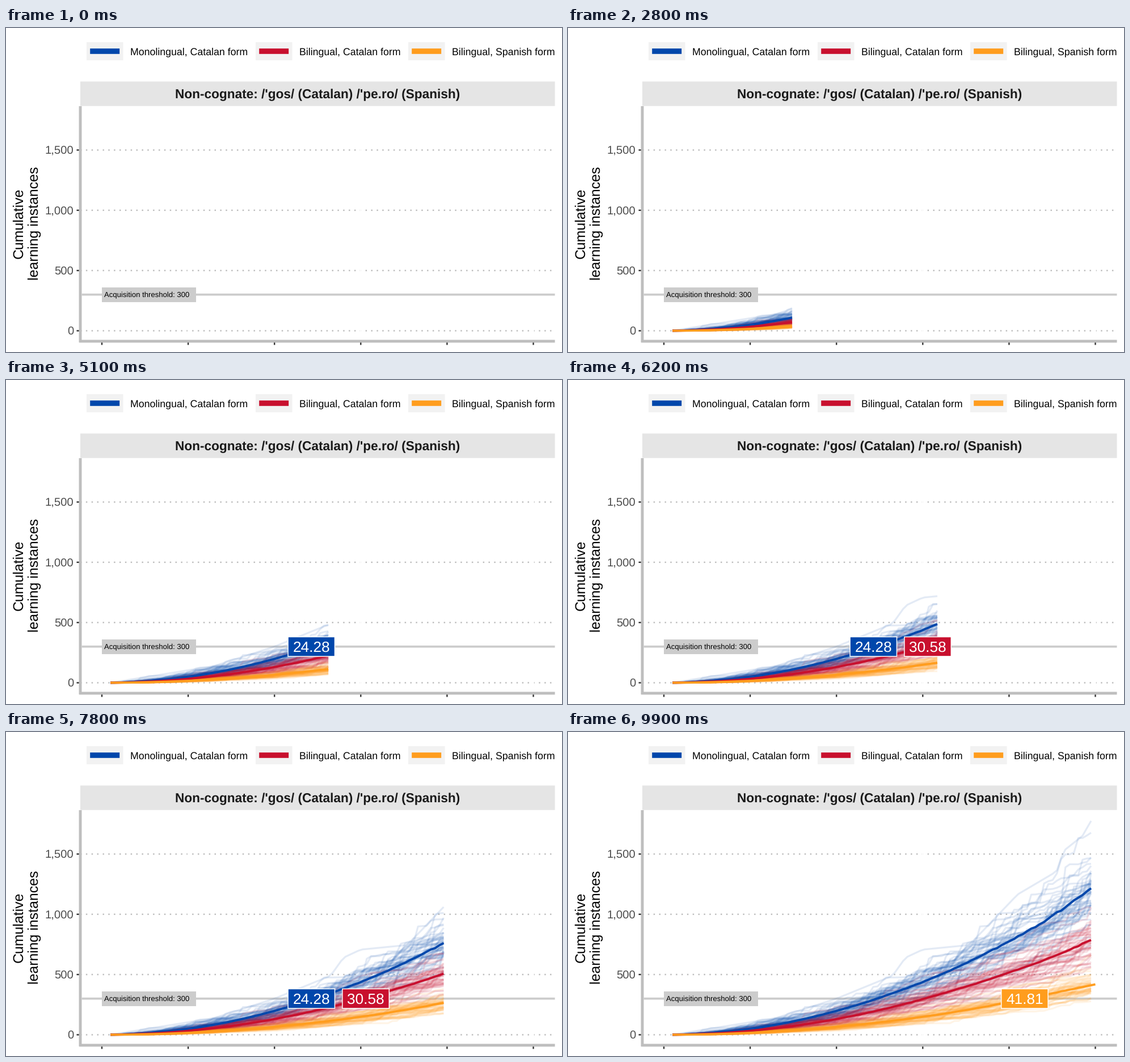
A matplotlib script that plays this animation: 980x572 px, repeating every 10 s.

```python
import numpy as np
import matplotlib.pyplot as plt
from matplotlib.animation import FuncAnimation
from matplotlib.collections import LineCollection
from matplotlib.patches import Rectangle

W, H, DPI = 980, 572, 100
PT = 72 / DPI                      # points per pixel
FRAMES, STRANDS = 100, 50
BLUE, RED, ORANGE = "#0047AB", "#C8102E", "#FF9D1E"
GREY, BAND, INK = "#BEBEBE", "#CCCCCC", "#333333"
LEFT, RIGHT, TOP, BOTTOM = 131, 967.5, 138, 553
THRESHOLD = 300

plt.rcParams.update({"font.family": "Liberation Sans",
                     "text.hinting": "none", "path.snap": False})

fig = plt.figure(figsize=(W / DPI, H / DPI), dpi=DPI, facecolor="white")
ax = fig.add_axes([0, 0, 1, 1])
ax.set(xlim=(0, W), ylim=(H, 0))
ax.axis("off")


def px(month):
    return 169 + 15.21 * month


def py(count):
    return 534.5 - 0.2127 * count


def rect(x0, y0, x1, y1, color, z=1, lw=0, **kw):
    return ax.add_patch(Rectangle((x0, y0), x1 - x0, y1 - y0, fc=color,
                                  lw=lw * PT, zorder=z, **kw))


def line(xs, ys, color, width, z=1, **kw):
    return ax.plot(xs, ys, color=color, lw=width * PT, zorder=z,
                   solid_capstyle="butt", **kw)[0]


def text(x, y, s, size, color="black", z=2, **kw):
    return ax.text(x, y, s, fontsize=size * PT, color=color, zorder=z,
                   va="baseline", **kw)


def draw_legend():
    keys = [(142, "Monolingual, Catalan form", BLUE),
            (440, "Bilingual, Catalan form", RED),
            (709, "Bilingual, Spanish form", ORANGE)]
    for x, name, color in keys:
        rect(x, 25, x + 64.6, 57, "#F2F2F2")
        line([x + 6.2, x + 58.2], [41, 41], color, 9.6, 2)
        text(x + 77, 47.3, name, 17.7)


def draw_panel():
    rect(LEFT, 94.5, RIGHT, 137.7, "#E5E5E5")
    text(549, 124.4, "Non-cognate: /'gos/ (Catalan) /'pe.ro/ (Spanish)", 22.6,
         "#1A1A1A", ha="center", weight="bold")
    for v in range(0, 1501, 500):
        y = py(v)
        line([LEFT, RIGHT], [y, y], GREY, 2.464,
             linestyle=(0, (1, 3)), dash_capstyle="butt")
        line([124.5, LEFT], [y, y], INK, 2.4)
        text(119, y + 7.2, f"{v:,}", 20.3, "#4D4D4D", ha="right")
    for m in range(0, 51, 10):
        x = px(m)
        line([x, x], [TOP, BOTTOM], "white", 2.4, 1.5)
        line([x, x], [BOTTOM, 559.5], INK, 2.4)
    line([LEFT, LEFT], [TOP, BOTTOM + 2], GREY, 4.9, 2)
    line([LEFT - 2, RIGHT], [BOTTOM, BOTTOM], GREY, 4.9, 2)
    for x, s in ((29.5, "Cumulative"), (56.5, "learning instances")):
        text(x, 345, s, 24.9, ha="center", rotation=90, rotation_mode="anchor")
    y = py(THRESHOLD)
    line([LEFT + 2.5, RIGHT], [y, y], BAND, 3.7, 2)
    rect(169, 458, 335, 484, BAND, 2.1)
    text(173, 475.3, f"Acquisition threshold: {THRESHOLD}", 13.1, z=2.2)


months = np.linspace(1, 50, FRAMES)
X = px(months)
rng = np.random.default_rng(11)


class Group:
    """One kind of learner: bursty strands, their mean and its label."""

    def __init__(self, color, rates, crossing, z):
        # counts grow with the square of age, at a nearly constant rate
        base = np.interp(months, (20, 32, 44, 50), rates) * months ** 2
        wiggle = 1 + 0.003 * rng.standard_normal(FRAMES)
        self.mean_y = py(base * wiggle)
        self.mean = line([], [], color, 3.9, 6 + z, solid_joinstyle="round")

        shape = 0.55
        steps = np.diff(base) * rng.gamma(shape, 1 / shape, (STRANDS, FRAMES - 1))
        counts = np.cumsum(np.insert(steps, 0, base[0], axis=1), axis=1)
        self.paths = np.stack([np.tile(X, (STRANDS, 1)), py(counts)], axis=-1)
        self.cloud = LineCollection([], colors=color, alpha=0.11,
                                    linewidths=3.2 * PT, capstyle="butt",
                                    joinstyle="round", zorder=3 + z / 10)
        ax.add_collection(self.cloud, autolim=False)

        x, y = px(crossing), py(THRESHOLD)
        self.label = (
            rect(x - 41.2, y - 17.2, x + 41.2, y + 17.2, color, 9, 1.5, ec="white"),
            text(x, y + 9.2, f"{crossing:.2f}", 26.2, "white", 10, ha="center"))
        self.start = round((crossing - 1) / 49 * (FRAMES - 1))

    def route(self, i, points):
        """Send one strand through (month, count) points."""
        self.paths[i, :, 1] = py(np.interp(months, *zip(*points)))

    def show(self, end, mean_end, labelled):
        self.cloud.set_segments(list(self.paths[:, :end]) if end else [])
        self.mean.set_data(X[:mean_end], self.mean_y[:mean_end])
        for part in self.label:
            part.set_visible(labelled)


mono = Group(BLUE, (0.496, 0.485, 0.484, 0.497), 24.28, 0)
bi_cat = Group(RED, (0.326, 0.329, 0.319, 0.321), 30.58, 1)
bi_spa = Group(ORANGE, (0.165, 0.166, 0.170, 0.168), 41.81, 2)
groups = (mono, bi_cat, bi_spa)

# the two fastest learners
mono.route(0, [(1, 0), (10, 70), (20, 300), (26.5, 490), (28, 640),
               (30, 707), (35, 742), (47.5, 955), (50, 955)])
mono.route(1, [(1, 0), (20, 220), (32, 500), (37, 865), (41, 1165),
               (45.5, 1355), (46.3, 1525), (48.5, 1650), (49.5, 1775)])

draw_legend()
draw_panel()


def update(n):
    last = n == FRAMES - 1
    end = min(n + 1, FRAMES - 1) if n else 0
    for g in groups:
        final = g is bi_spa
        g.show(end, FRAMES if last and final else end,
               n >= g.start and (final or not last))


anim = FuncAnimation(fig, update, frames=FRAMES, interval=100,
                     repeat=True, repeat_delay=0, blit=False)
plt.show()
```
